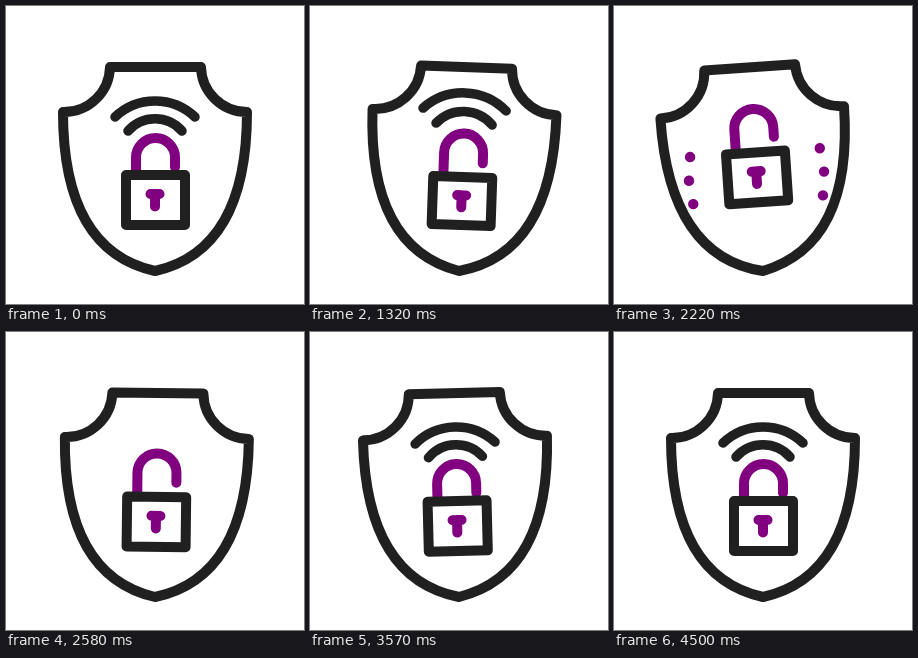
An HTML page for the animation above (4.8 s loop, 298x298 px).

```html
<!DOCTYPE html>
<html lang="en">
<head>
<meta charset="utf-8">
<title>Shield and lock</title>
<style>
  html, body { margin: 0; width: 100%; height: 100%; overflow: hidden; background: #fff; }
  svg { display: block; width: 100%; height: 100%; }
  .line {
    fill: none; stroke: #202020; stroke-width: 10; stroke-linecap: round; stroke-linejoin: round;
    vector-effect: non-scaling-stroke;
  }
  .wave { stroke-width: 9.5; }
  .accent { stroke: #800080; }
  .dot { fill: #800080; }
  .plate { fill: #fff; }
</style>
</head>
<body>
<svg viewBox="0 0 298 298">
  <g id="shield">
    <path class="line" d="M104 61H195A46 46 0 0 0 241 106C241 196 212 251 149 265C86 251 57 196 57 106A46 46 0 0 0 104 61Z"/>
    <g id="dots"></g>
    <path id="outerWave" class="line wave" d="M109 111A58 58 0 0 1 189 111"/>
    <path id="innerWave" class="line wave" d="M122 125A36 36 0 0 1 176 125"/>
    <path id="shackle" class="line accent" d="M130 174V151.5A19.5 19.5 0 0 1 169 151.5V161"/>
    <g id="body">
      <rect class="line plate" x="120" y="169" width="59" height="50"/>
      <path class="line accent" d="M144.500 188H153.500M149 188V200.500"/>
    </g>
  </g>
</svg>
<script>
const LOOP = 4800, STEP = 30, REST = 4500;
const CENTER = 149;
const el = id => document.getElementById(id);
const transform = (id, value) => el(id).setAttribute("transform", value);

// Smooth 0 to 1 between two times.
function ramp(t, from, to) {
  const u = Math.min(1, Math.max(0, (t - from) / (to - from)));
  return (1 - Math.cos(Math.PI * u)) / 2;
}

// Smooth 0 to 1 to 0.
const pulse = (t, from, peak, to) => ramp(t, from, peak) - ramp(t, peak, to);

// One slow lean, a big swing to the left, then half swings of equal length.
function tiltAt(t) {
  const half = 600;
  let angle = 2 * ramp(t, 330, 1400) - 5.9 * ramp(t, 1590, 2250);
  let previous = -3.9, begin = 2250;
  for (const next of [4, -1.8, 1.9, 0]) {
    angle += (next - previous) * ramp(t, begin, Math.min(begin + half, REST));
    previous = next;
    begin += half;
  }
  return angle;
}

const waveSize = t =>
  1 + 0.04 * ramp(t, 960, 1320) - 1.04 * ramp(t, 1410, 1740) + ramp(t, 2760, 3240);

function placeWave(id, size, lift) {
  el(id).style.display = size > 0.02 ? "" : "none";
  transform(id, `translate(${CENTER} ${125 + lift}) scale(${size}) translate(${-CENTER} -125)`);
}

const dots = [];
for (const side of [-1, 1]) {
  for (const row of [-1, 0, 1]) {
    const node = document.createElementNS("http://www.w3.org/2000/svg", "circle");
    node.setAttribute("class", "dot");
    el("dots").append(node);
    dots.push({ node, x: side * (row ? 65 : 67.7), y: row * 23.6 });
  }
}

function placeDots(t) {
  const spread = 0.55 + 0.45 * ramp(t, 1860, 2220);
  const radius = 5.2 * (ramp(t, 1860, 2130) - ramp(t, 2280, 2490));
  for (const { node, x, y } of dots) {
    node.setAttribute("cx", CENTER + x * spread);
    node.setAttribute("cy", 170 + y * spread);
    node.setAttribute("r", radius);
  }
}

function draw(t) {
  const jump = -23 * pulse(t, 1560, 2190, 2730);
  const landing = pulse(t, 2820, 3120, 3450);
  const squash = 1 - 0.09 * pulse(t, 1170, 1500, 1740) - 0.12 * landing;
  const open = ramp(t, 1170, 1410) - ramp(t, 2700, 3000);

  transform("shield", `rotate(${tiltAt(t)} ${CENTER} 266)`);
  transform("shackle", `translate(0 ${jump - 6.5 * open + 6 * landing})`);
  transform("body", `translate(0 ${219 + jump + landing}) scale(1 ${squash}) translate(0 -219)`);

  const waveLift = -7 * (ramp(t, 960, 1320) - ramp(t, 2400, 3420));
  placeWave("outerWave", waveSize(t), waveLift);
  placeWave("innerWave", waveSize(t > 2400 ? t - 45 : t), waveLift);
  placeDots(t);
}

const start = performance.now();
function frame() {
  const t = (performance.now() - start) % LOOP;
  draw(Math.floor(t / STEP) * STEP);
  requestAnimationFrame(frame);
}
draw(0);
requestAnimationFrame(frame);
</script>
</body>
</html>
```
